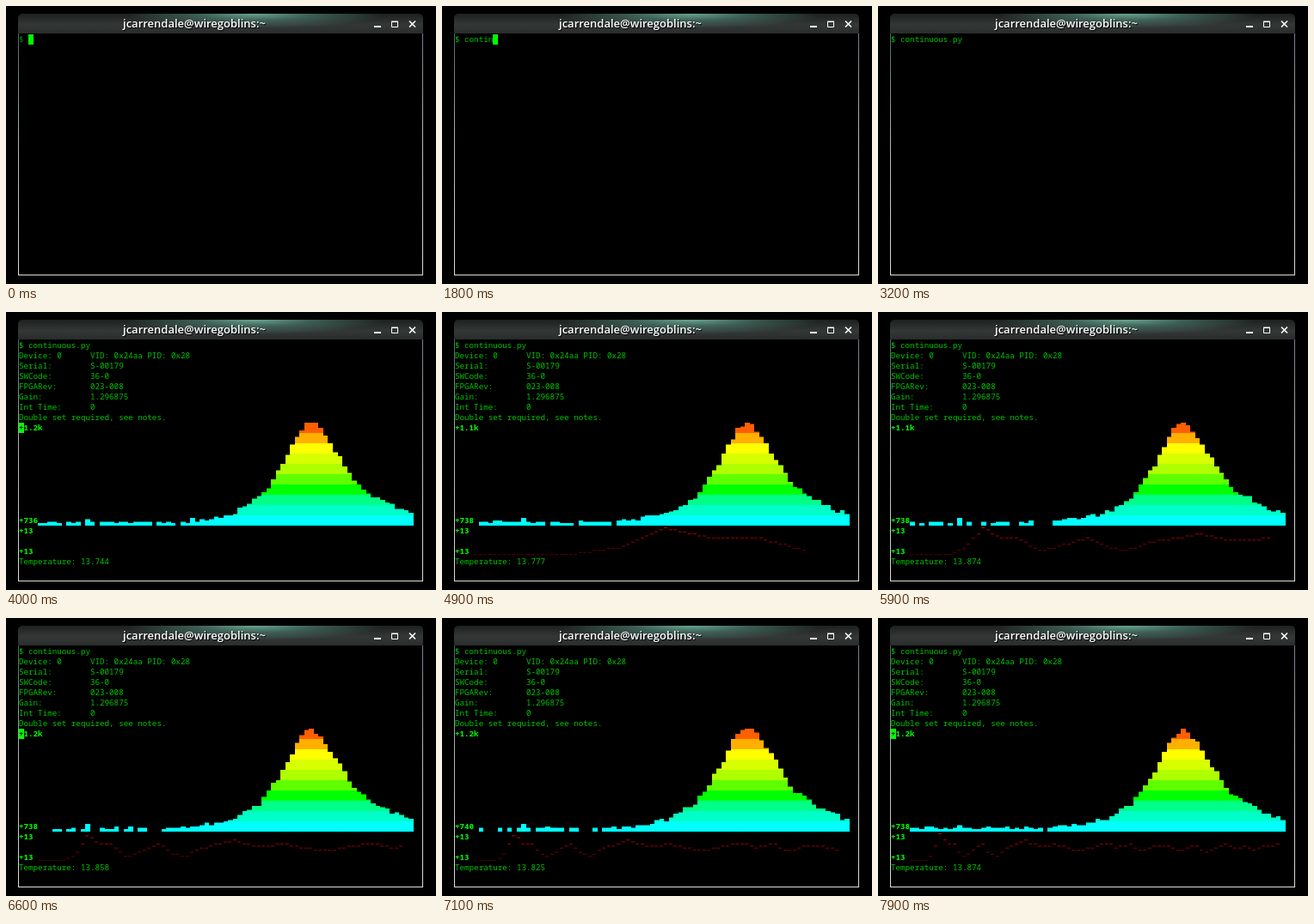
These frames come from a looping animation (500 by 324 pixels, 8000 ms). An HTML page with a canvas:

```html
<!DOCTYPE html>
<html lang="en">
<head>
<meta charset="utf-8">
<title>Terminal spectrum</title>
<style>
html, body { margin: 0; width: 100%; height: 100%; overflow: hidden; background: #000; }
#stage { position: relative; width: 500px; height: 324px; overflow: hidden; }
#stage > * { position: absolute; }
#bar {
  left: 14px; top: 9px; width: 471px; height: 23px; border-radius: 5px 5px 0 0;
  background:
    radial-gradient(ellipse 150px 17px at 275px 0, #6aa592 0, #4a7b6caa 45%, transparent 100%),
    linear-gradient(#1c2120, #333837 55%, #2a2c2c);
}
#title {
  left: 14px; top: 10px; width: 410px; text-align: center; white-space: nowrap;
  font: 600 13px/20px "Open Sans", "Noto Sans", sans-serif;
  color: #fff; text-shadow: 1px 1px 1px #000;
}
#frame {
  left: 14px; top: 32px; width: 1px; height: 281px; border-bottom: 1px solid #ddd;
  width: 471px;
  background:
    linear-gradient(#44695f, #aab8b4 45%, #ddd) 0 0 / 1px 100% no-repeat,
    linear-gradient(#778, #bbb 45%, #ddd) 100% 0 / 1px 100% no-repeat;
}
svg { left: 0; top: 0; }
pre {
  left: 15px; top: 33px; margin: 0; color: #00c400;
  font: 9.22px/12px "Noto Sans Mono", "DejaVu Sans Mono", monospace;
}
pre b { color: #0f0; }
pre i { color: #030; font-style: normal; }
</style>
</head>
<body>
<div id="stage">
  <div id="bar"></div>
  <div id="title">jcarrendale@wiregoblins:~</div>
  <div id="frame"></div>
  <svg width="500" height="324" fill="none" stroke="#fff">
    <path d="M428 24h8" stroke-width="2"/>
    <path d="M448.5 18.5h7v6h-7zM448 18h8"/>
    <path d="M469 17.5l7 7m0-7l-7 7" stroke-width="1.6"/>
  </svg>
  <canvas width="500" height="324"></canvas>
  <pre></pre>
</div>
<script>
const LOOP = 8000, STEP = 100, CELL = 5.53, ROW = 12, TOP = 33;
const FIRST = 4, COLS = 79, BASE = TOP + 18 * ROW;
const ctx = document.querySelector('canvas').getContext('2d');
const pre = document.querySelector('pre');

const command = 'continuous.py';
const info = `Device: 0      VID: 0x24aa PID: 0x28
Serial:        S-00179
SWCode:        36-0
FPGARev:       023-008
Gain:          1.296875
Int Time:      0
Double set required, see notes.`;

// Row colours from the floor of the spectrum upwards
const bands = ['#0ff', '#00ffc8', '#00ff87', '#0f0', '#5fff00',
               '#afff00', '#d7ff00', '#ff0', '#ffaf00', '#ff5f00'];

// Spectrum outline: x, height
const outline = [[38, 3], [190, 3.5], [215, 6], [240, 9], [265, 15], [280, 24], [295, 33],
  [305, 46], [315, 61], [325, 76], [335, 97], [345, 115], [353, 119], [362, 117],
  [370, 106], [380, 90], [390, 76], [400, 59], [410, 46], [420, 39], [435, 30],
  [450, 22], [465, 16], [475, 13]];

// Temperature history in sensor steps
const temps = [0, 0, 0, 3, 13, 8, 8, 2, 3, 6, 8, 3, 2, 5, 7, 8, 10, 8, 7, 7, 8, 7, 6, 5, 5, 6, 7,
  8, 8, 6, 7, 8, 5, 5, 7, 7, 7, 6, 5, 6, 8, 5, 4, 6, 8, 7, 6, 7, 5, 6, 7, 7, 8];

const colX = c => Math.round(15 + c * CELL);
const lerp = (a, b, f) => a + (b - a) * f;
const rnd = (a, b) => {
  const v = Math.sin(a * 127.1 + b * 311.7) * 43758.5453;
  return v - Math.floor(v);
};

function shape(x) {
  const k = Math.max(1, outline.findIndex(p => p[0] >= x));
  const [[x0, h0], [x1, h1]] = [outline[k - 1], outline[k]];
  return lerp(h0, h1, (x - x0) / (x1 - x0));
}

function cursor(col, row) {
  ctx.fillStyle = '#0f0';
  ctx.fillRect(colX(col), TOP + row * ROW, 6, ROW);
}

function drawSpectrum(t, step) {
  const gap = 0.1 + 0.33 * Math.max(0, Math.sin((t - 5200) / 2700 * Math.PI));
  const heights = Array.from({ length: COLS }, (_, c) => {
    const h = shape(15 + (c + FIRST + 0.5) * CELL), r = rnd(c + 1, step);
    if (h > 5) return h + (r - 0.5) * 5;
    if (c === 10) return 7 + r * 3;
    return r < gap ? 0 : 3 + 2.5 * rnd(step, c);
  });
  const scale = 120 / Math.max(...heights);
  heights.forEach((height, c) => {
    const h = Math.round(height * scale / 1.5) * 1.5, x = colX(c + FIRST);
    for (let r = 0; r * ROW < h; r++) {
      const part = Math.min(ROW, h - r * ROW);
      ctx.fillStyle = bands[r];
      ctx.fillRect(x, BASE - r * ROW - part, colX(c + FIRST + 1) - x, part);
    }
  });
}

// The whole history is squeezed into the same width as it grows
function drawTemps(n) {
  for (let c = 0; c < COLS; c++) {
    const p = c / COLS * n, k = Math.floor(p);
    if (p > n - 1) break;
    const level = Math.round(lerp(temps[k], temps[k + 1] ?? temps[k], p - k));
    ctx.fillStyle = `rgb(${70 + level * 7},0,0)`;
    ctx.fillRect(colX(c + FIRST), 282 - level * 2.4, 4, 1.2);
  }
}

function typed(t) {
  if (t < 2100) return Math.max(0, Math.min(7, t / STEP - 12));
  return t < 2400 ? Math.min(10, t / STEP - 12) : Math.min(13, t / STEP - 13);
}

function drawPrompt(t) {
  const n = typed(t);
  pre.innerHTML = `<span style="color:${t < 600 ? '#008c00' : '#00c400'}">$</span> ` + command.slice(0, n);
  if (t >= 2700) {
    if (t < 3200) cursor(0, 1);
  } else if (t < 100 || t >= 700) cursor(n + 2, 0);
}

function drawReadout(t, step) {
  const u = Math.max(0, (t - 4200) / 1000);
  const n = Math.min(temps.length, Math.round(10.6 * u + u * u));
  const peak = t > 4400 && t < 6600 ? '1.1k' : '1.2k';
  const floor = t < 4400 ? 736 : t > 6600 && t < 7500 ? 740 : 738;
  const temp = 13.7441 + 0.01625 * temps[Math.max(0, n - 1)];
  const lit = step % 13 < 4;
  pre.innerHTML = `$ ${command}\n${info}\n<b>${lit ? '<i>+</i>' : '+'}${peak}</b>` + '\n'.repeat(9) +
    `<b>+${floor}\n+13\n\n+13</b>\nTemperature: ${temp.toFixed(3)}`;
  drawSpectrum(t, step);
  if (n > 1) drawTemps(n);
  if (lit) cursor(0, 8);
}

let last = -1;
function tick(now) {
  const step = Math.floor(now % LOOP / STEP), t = step * STEP;
  if (step !== last) {
    last = step;
    ctx.clearRect(0, 0, 500, 324);
    if (t < 3800) drawPrompt(t);
    else drawReadout(t, step);
  }
  requestAnimationFrame(tick);
}
tick(performance.now());
</script>
</body>
</html>
```
